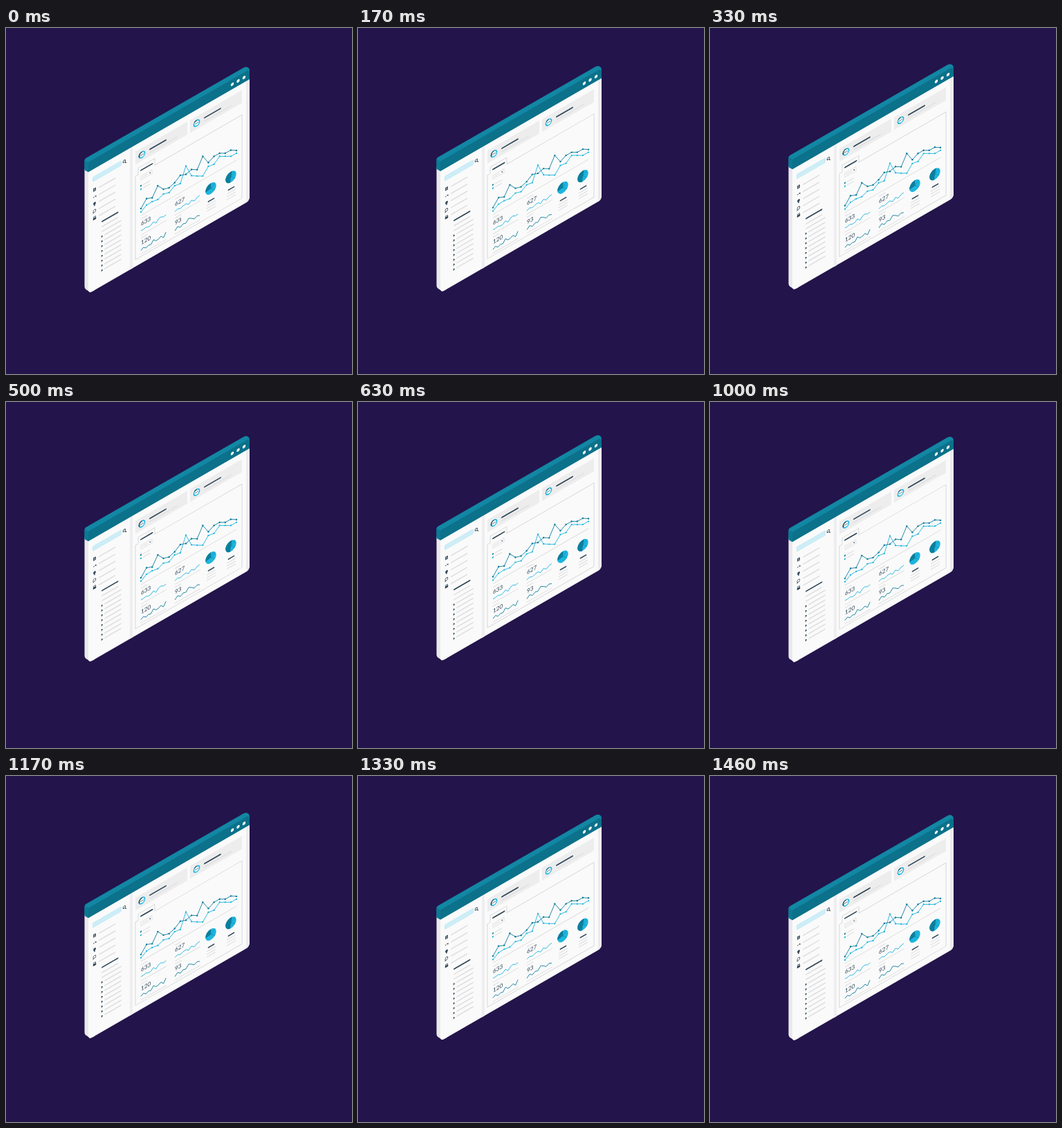
Animation of 500x500 px, one loop 1500 ms. Source, as an HTML page:

```html
<!DOCTYPE html>
<html lang="en">
<head>
<meta charset="utf-8">
<title>Floating dashboard</title>
<style>
  html, body { margin: 0; width: 100%; height: 100%; overflow: hidden; background: #23144b; }
  svg { display: block; width: 100%; height: 100%; }
  text { font-family: Lato, sans-serif; }
</style>
</head>
<body>
<svg viewBox="0 0 500 500"><g id="win"></g></svg>
<script>
const TEAL = '#0c718a', DEEP = '#0e7d9c', CYAN = '#1db5de', INK = '#2f4656', GREY = '#dedee0', RULE = '#d6d6d8';

const line = (x, y, w, color = GREY, width = 1.7) =>
  `<path d="M${x} ${y}h${w}" stroke="${color}" stroke-width="${width}" stroke-linecap="round"/>`;
const rect = (x, y, w, h, fill, extra = '') =>
  `<rect x="${x}" y="${y}" width="${w}" height="${h}" fill="${fill}" ${extra}/>`;
const dot = (x, y, r, fill) => `<circle cx="${x}" cy="${y}" r="${r}" fill="${fill}"/>`;
const repeat = (n, fn) => Array.from({ length: n }, (_, i) => fn(i)).join('');

// Angles are fractions of a turn, clockwise from the top
const polar = (x, y, r, a) =>
  [x + r * Math.sin(a * 2 * Math.PI), y - r * Math.cos(a * 2 * Math.PI)].map(n => n.toFixed(2)).join(' ');
const arc = (x, y, r, a, b) =>
  `${polar(x, y, r, a)}A${r} ${r} 0 ${b - a > .5 ? 1 : 0} 1 ${polar(x, y, r, b)}`;
const wedge = (x, y, r, a, b, fill) => `<path d="M${x} ${y}L${arc(x, y, r, a, b)}Z" fill="${fill}"/>`;

function series(x, step, ys, color, width, r) {
  const pts = ys.map((y, i) => [x + i * step, y]);
  return `<polyline points="${pts.join(' ')}" fill="none" stroke="${color}" stroke-width="${width}" stroke-linejoin="round"/>` +
    (r ? pts.map(p => dot(p[0], p[1], r, color)).join('') : '');
}

function sidebar() {
  const icons = [
    rect(-2, -2.3, 4, 4.6, INK, 'rx=".6"') + line(-1, -.6, 2, '#fff', .5) + line(-1, .9, 2, '#fff', .5),
    `<path d="M-2 .3h1.5M.4-.3h1.6v1.6" fill="none" stroke="${INK}" stroke-width="1"/>`,
    dot(0, -.7, 1.9, INK) + rect(-.8, .8, 1.6, 2, INK),
    `<path d="M-1.9 2.4v-3.2a1.9 1.9 0 1 1 1.9 2.4z" fill="none" stroke="${INK}" stroke-width=".8"/>`,
    rect(-2.2, -.8, 4.4, 3, INK) + `<path d="M-1.3-.8v-1.5h2.6v1.5" fill="none" stroke="${INK}" stroke-width=".8"/>`
  ];
  return rect(6.5, 26.4, 41, 6.6, '#cdeef7', 'rx=".8" stroke="#b4e5f1" stroke-width=".5"') +
    `<path d="M53 31.2l1.9 2.4" stroke="${INK}" stroke-width="1"/>` +
    `<circle cx="51.8" cy="29.6" r="1.7" fill="none" stroke="${INK}" stroke-width=".9"/>` +
    icons.map((d, i) => `<g transform="translate(9 ${45.8 + 10.3 * i})">${d}</g>`).join('') +
    repeat(5, i => line(16, 46.3 + 10.2 * i, 22.5)) +
    line(20, 98, 22.5, INK, 1.9) + line(20, 105.5, 22.5) + line(20, 112.5, 27) +
    repeat(8, i => `<path d="M18.8 ${117.8 + 7 * i}l2.4 1.8-2.4 1.8z" fill="${INK}"/>` + line(24, 119.5 + 7 * i, 23));
}

function card(x, from, label) {
  const cx = x + 9.5, cy = 34.8;
  return rect(x, 25, 75, 18.5, '#ededee') +
    `<circle cx="${cx}" cy="${cy}" r="4.1" fill="#fff" stroke="${CYAN}" stroke-width="1.6"/>` +
    `<path d="M${arc(cx, cy, 4.1, from, 1)}" fill="none" stroke="${INK}" stroke-width="1.6"/>` +
    `<text x="${cx}" y="${cy + .9}" font-size="2.6" font-weight="700" text-anchor="middle" fill="${INK}">${label}</text>` +
    line(x + 21, 33.6, 23, INK, 1.9) + line(x + 21, 38.3, 39, GREY, 1.3);
}

const stat = (x, y, value) =>
  line(x + .5, y - 10, 8.5, GREY, 1.2) +
  `<text x="${x}" y="${y}" font-size="8.2" fill="${INK}">${value}</text>` +
  line(x, y + 13, 36.5, RULE, .8);

const pieNotes = x =>
  line(x - 3.5, 158, 8, INK, 1.7) + repeat(3, i => line(x - 5.5, 162.7 + 4 * i, 12, GREY, 1.2));

const pie = (x, from, to) =>
  dot(x, 141.2, 7.8, CYAN) + wedge(x, 141.2, 7.8, from, to, DEEP) +
  [0, .14, .36].map(a => `<path d="M${x} 141.2L${polar(x, 141.2, 7.8, a)}" stroke="${DEEP}" stroke-width=".4"/>`).join('') +
  pieNotes(x);

function panel() {
  return `<path d="M68 60.6h4V51h24v9.6h126V181H68z" fill="#fafafa" stroke="${RULE}" stroke-width=".9"/>` +
    line(76, 56.5, 16.5, INK, 1.9) +
    rect(76, 65, 16, 5.6, '#fafafa', `stroke="${RULE}" stroke-width=".6"`) +
    line(78, 67.8, 7.5, GREY, 1.1) + dot(89.3, 67.8, .8, INK) +
    dot(76, 78.9, 1.2, DEEP) + dot(76, 83.8, 1.2, CYAN) +
    line(79.5, 79.2, 9, GREY, 1.2) + line(79.5, 83.8, 9, GREY, 1.2) +
    line(76, 121.7, 138, RULE, .8) +
    stat(76, 137, '633') + stat(76, 164.5, '120') + stat(125, 136.8, '627') + stat(125, 164, '93') +
    pie(177, .72, 1) + pie(206, .52, 1.04);
}

const charts = () =>
  series(195, 8.12, [266, 256, 251, 248, 240, 238, 228, 225, 199.5, 213.5, 214, 214, 200, 197, 185.5, 185.5, 185.5, 181], CYAN, .9, 1.15) +
  series(195, 8.12, [261, 246.5, 245.5, 228, 233, 231, 223.5, 213, 211.5, 204.5, 204.8, 185.5, 194.5, 185.5, 181, 181, 176.5, 177], DEEP, .9, 1.2) +
  series(195, 3.62, [293, 291, 288, 287.5, 285, 280, 282, 276, 273, 273, 270], CYAN, .9) +
  series(195, 3.62, [321.5, 317, 318, 314, 313, 306, 307.5, 305, 301, 303, 295], DEEP, .9) +
  series(244, 4, [265.5, 261.5, 261, 257, 254, 255, 249, 250, 245, 242], CYAN, .9) +
  series(244, 4, [293, 287, 288, 283, 282, 275, 275, 276, 271.5, 271], DEEP, .9);

const win = document.getElementById('win');
win.innerHTML =
  `<path d="M113.5 203V373q0 3.8 2.6 5.2l5.6 3.6L128 379V204z" fill="#e9e9ec"/>
   <path d="M113.5 205v-13.5q0-2.2 2-3.4L343.5 57.2q3.8-1.8 6.3.2 2.6 1.7 2.2 7L119 200z" fill="#1287a4"/>
   <path d="M113.5 190.7l5.7 3.6v14.2l-5.7-3.3z" fill="#0d7992"/>
   <g transform="matrix(1 -.577 0 1 119 193)">
     <path d="M0 14H233V185q0 6-6 6H6q-6 0-6-6z" fill="#fafafa"/>
     <path d="M228 15h5v170q0 6-5 6z" fill="#ececee"/>
     ${rect(60, 15, 4, 176, '#eeeef0')}
     <path d="M0 15.4V3q0-2 2-2H228q5 0 5 5v9.4z" fill="${TEAL}"/>
     ${[208, 216.5, 225].map(x => dot(x, 8.4, 2.2, '#fff')).join('')}
     ${sidebar()}${card(68, .68, '68%')}${card(147, .86, '86%')}${panel()}
   </g>` + charts();

// Bob on a 24 fps clock
const LOOP = 1500, TICK = LOOP / 36, LIFT = 4.4, LEAD = 30;
const start = performance.now();
function draw(now) {
  const t = Math.floor((Math.max(0, now - start) % LOOP + 4.9) / TICK) * TICK;
  const y = -LIFT * (1 - Math.cos((t + LEAD) / LOOP * 2 * Math.PI));
  win.setAttribute('transform', `translate(0 ${y.toFixed(3)})`);
  requestAnimationFrame(draw);
}
draw(start);
</script>
</body>
</html>
```
